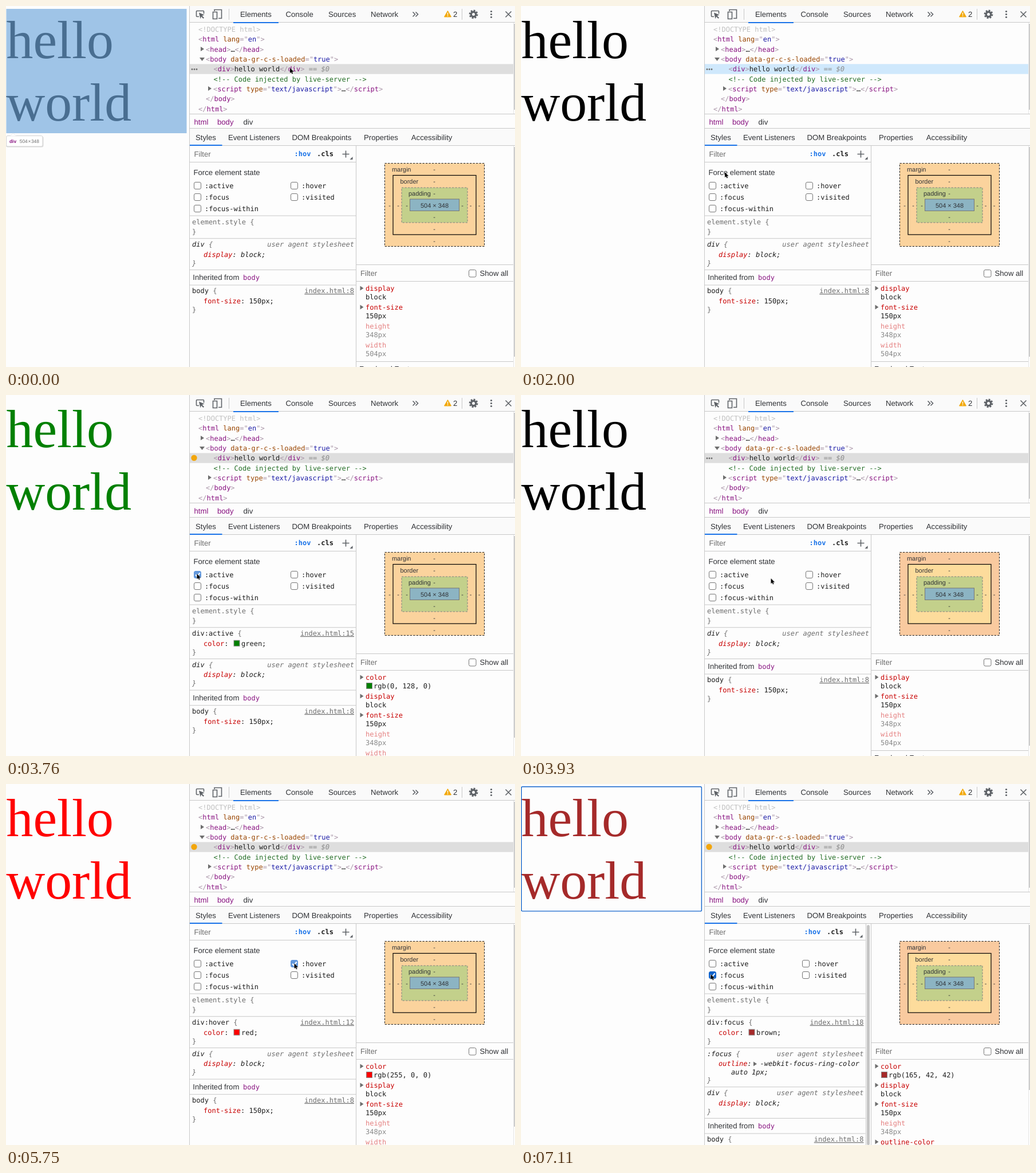
An HTML page that plays this animation: 889 px wide and 630 px high, repeating every 8 s.

```html
<!DOCTYPE html>
<html lang="en">
<head>
<meta charset="utf-8">
<title>Forcing element states</title>
<style>
html, body { margin: 0; width: 100%; height: 100%; overflow: hidden; background: #fdfdfd; }
svg { display: block; width: 889px; height: 630px; }
text { white-space: pre; text-rendering: geometricPrecision; fill: #303236; }
.ui { font: 13.15px "Liberation Sans", Arial, sans-serif; }
.small { font-size: 10.95px; }
.code { font: 12px "DejaVu Sans Mono", monospace; fill: #1c1c1c; }
.it { font-style: italic; }
.bold { font-weight: bold; }
.end { text-anchor: end; }
.mid { text-anchor: middle; }
.link { text-decoration: underline; }
.tag { fill: #881280; }
.punct { fill: #a894a6; }
.attr { fill: #994500; }
.val { fill: #1a1aa6; }
.note { fill: #236e25; }
.pale { fill: #c0c0c0; }
.gray { fill: #6e6e6e; }
.prop { fill: #c80000; }
.dimprop { fill: #e58080; }
.dim { fill: #888; }
.blue { fill: #1a73e8; }
.line { stroke: #c8c8c8; fill: none; }
.track { stroke: #e6e6e6; }
.thumb { fill: #c4c4c4; }
.icon { stroke: #5f6368; fill: none; stroke-width: 1.6; }
.box { fill: #fff; stroke: #767676; }
.hello { font: 93.75px "Liberation Serif", "Times New Roman", serif; }

.hello, #inspect, #row, #dots, #dot, #ring, #cursor, #press, .state, #margin, #border {
  animation: 8s step-end infinite;
}
.hello { fill: #000; animation-name: hello; }
@keyframes hello {
  0%, 49.125%, 73.625% { fill: #000; }
  36.5% { fill: green; }
  59.875% { fill: red; }
  87.375% { fill: brown; }
}
#inspect { animation-name: inspect; }
@keyframes inspect { 0% { opacity: 1; } 23.125% { opacity: 0; } }
#row { animation-name: row; }
@keyframes row { 0%, 34.625% { fill: #dedede; } 1.5% { fill: #cfe8fc; } }
#plain, #dots { animation-name: plain; }
@keyframes plain {
  0%, 49.125%, 73.625% { opacity: 1; }
  36.5%, 59.875%, 87.375% { opacity: 0; }
}
#dot { animation-name: forced; }
@keyframes forced {
  0%, 49.125%, 73.625% { opacity: 0; }
  36.5%, 59.875%, 87.375% { opacity: 1; }
}
#active { animation-name: active; }
@keyframes active { 0%, 49.125% { opacity: 0; } 36.5% { opacity: 1; } }
#hover { animation-name: hover; }
@keyframes hover { 0%, 73.625% { opacity: 0; } 59.875% { opacity: 1; } }
#focus, #ring { animation-name: focus; }
@keyframes focus { 0% { opacity: 0; } 87.375% { opacity: 1; } }
#margin { animation-name: margin; }
@keyframes margin {
  0%, 59.875% { fill: #fbd39d; }
  49.125%, 73.625% { fill: #f9ca9f; }
}
#border { animation-name: border; }
@keyframes border {
  0%, 59.875% { fill: #fbd39d; }
  49.125%, 73.625% { fill: #fddc9c; }
}
#press { animation-name: press; }
@keyframes press {
  0%, 36.5%, 49.125%, 59.875%, 73.625%, 87.375% { opacity: 0; }
  34.625%, 47% { opacity: 1; transform: translate(328px, 307px); }
  58.5%, 71.875% { opacity: 1; transform: translate(497px, 307px); }
  85.875% { opacity: 1; transform: translate(328px, 327px); }
}
#cursor { animation-name: cursor; }
@keyframes cursor {
  0% { transform: translate(496px, 108px); }
  19.875% { transform: translate(488.5px, 121.5px); }
  21.375% { transform: translate(404.5px, 227px); }
  23.125% { transform: translate(374px, 257px); }
  25% { transform: translate(356px, 290px); }
  26.875% { transform: translate(339.5px, 308px); }
  28.75% { transform: translate(336px, 311px); }
  30.125% { transform: translate(334px, 312px); }
  31.625% { transform: translate(333.5px, 312px); }
  49.125% { transform: translate(436.5px, 320px); }
  50.625% { transform: translate(485.5px, 317px); }
  52.5% { transform: translate(500px, 314px); }
  54% { transform: translate(503.5px, 313px); }
  75.125% { transform: translate(502px, 314px); }
  76.875% { transform: translate(490px, 319px); }
  78.375% { transform: translate(438px, 326px); }
  79.875% { transform: translate(373px, 331px); }
  81.375% { transform: translate(339.5px, 333px); }
  82.875% { transform: translate(332px, 332px); }
  88.875% { transform: translate(331.5px, 332px); }
}
</style>
</head>
<body>
<svg id="stage" viewBox="0 0 889 630"></svg>
<script>
const esc = s => s.replace(/&/g, '&amp;').replace(/</g, '&lt;');
const span = (cls, s) => `<tspan class="${cls}">${esc(s)}</tspan>`;
const write = (x, y, cls, inner) => `<text x="${x}" y="${y}" class="${cls}">${inner}</text>`;
const ui = (x, y, s, cls = '') => write(x, y, 'ui ' + cls, esc(s));
const code = (x, y, inner, cls = '') => write(x, y, 'code ' + cls, inner);
const rect = (x, y, w, h, extra = '') => `<rect x="${x}" y="${y}" width="${w}" height="${h}" ${extra}/>`;
const path = (d, extra) => `<path d="${d}" ${extra}/>`;
const line = (d, cls = '') => path(d, `class="line ${cls}"`);
const fill = c => `fill="${c}"`;
const right = (x, y) => path(`M${x} ${y - 4}l6 4l-6 4z`, fill('#6e6e6e'));
const down = (x, y) => path(`M${x} ${y - 3}h9l-4.5 6z`, fill('#6e6e6e'));
const swatch = (x, y, c) => rect(x + .5, y + .5, 10, 10, `fill="${c}" stroke="#8a8a8a"`);

const open = (name, attr, value) => span('punct', '<') + span('tag', name) +
  (attr ? span('attr', ' ' + attr) + span('punct', '="') + span('val', value) + span('punct', '"') : '') +
  span('punct', '>');
const close = name => span('punct', '</') + span('tag', name) + span('punct', '>');

function page() {
  return write(.5, 91, 'hello', 'hello') + write(.5, 199.7, 'hello', 'world') +
    `<g id="inspect">${rect(.5, 5, 315, 217, 'fill="#6fa8dc" fill-opacity=".66"')}
      ${rect(0, 227.5, 65.5, 19, 'rx="3" fill="#ddd"')}
      ${rect(.5, 226.5, 63.5, 18.5, 'rx="2.5" fill="#fff" stroke="#d2d2d2"')}
      ${path('M7 227l5.5-5l5.5 5z', 'fill="#fff" stroke="#ddd" stroke-width=".6"')}
      <text x="6" y="239" class="ui bold tag" style="font-size:8.4px">div</text>
      <text x="23.8" y="239" class="ui gray" style="font-size:8.4px;word-spacing:-1.7px">504 × 348</text></g>` +
    rect(.6, 4.7, 314.8, 217.2, 'id="ring" rx="2" fill="none" stroke="#1264cc" stroke-width="1.4"');
}

function toolbar() {
  return rect(321, 0, 568, 28, fill('#fafafa')) + line('M320.5 0V630M321 28.5H889') +
    path('M337 18.5h-3.5q-1 0-1-1v-8q0-1 1-1h11q1 0 1 1v4', 'class="icon"') +
    path('M337 11.5l9.5 4l-4 1.5l3.5 3.5l-1.5 1.5l-3.5-3.5l-1.5 4z', fill('#5f6368')) +
    path('M364 9V6.5h12.5v15H371M361.5 10.5h7v12h-7z', 'class="icon"') +
    line('M389.5 5V24M796.5 5V24') +
    [[409, 'Elements'], [488.5, 'Console'], [563, 'Sources'], [637, 'Network']]
      .map(([x, s]) => ui(x, 19.3, s)).join('') +
    rect(397, 28, 79, 2, 'class="blue"') +
    path('M710.5 10.5l4 4l-4 4M715.5 10.5l4 4l-4 4', 'class="icon"') +
    path('M771.5 8.5l6 10.5h-12z', 'fill="#f2a90c" stroke="#f2a90c" stroke-linejoin="round"') +
    path('M771.5 11.5v4M771.5 16.5v1.5', 'stroke="#fff" stroke-width="1.3"') +
    ui(781, 19, '2') +
    '<circle cx="816.5" cy="14.5" r="6.6" fill="none" stroke="#5f6368" stroke-width="2.6" stroke-dasharray="2.9 2.28"/>' +
    '<circle cx="816.5" cy="14.5" r="4.2" fill="none" stroke="#5f6368" stroke-width="3.4"/>' +
    [9.5, 14.5, 19.5].map(y => `<circle cx="847.5" cy="${y}" r="1.6" fill="#5f6368"/>`).join('') +
    path('M872.5 9.5l10 10M882.5 9.5l-10 10', 'class="icon"');
}

function tree() {
  const row = i => 45 + 17.32 * i;
  return rect(321, 101.3, 565, 17.4, 'id="row"') +
    '<g id="dots">' + [325, 329, 333].map(x => `<circle cx="${x}" cy="110.5" r="1.4" fill="#6e6e6e"/>`).join('') + '</g>' +
    '<circle id="dot" cx="328.5" cy="109.8" r="5.2" fill="#f2a60c"/>' +
    code(336, row(0), esc('<!DOCTYPE html>'), 'pale') +
    code(336, row(1), open('html', 'lang', 'en')) +
    right(340, 75) + code(349, row(2), open('head') + '…' + close('head')) +
    down(338, 93) + code(349, row(3), open('body', 'data-gr-c-s-loaded', 'true')) +
    code(362.5, row(4), open('div') + 'hello world' + close('div') + span('dim it', ' == $0')) +
    code(362.5, row(5), esc('<!-- Code injected by live-server -->'), 'note') +
    right(353, 144) + code(362, row(6), open('script', 'type', 'text/javascript') + '…' + close('script')) +
    code(349, row(7), close('body')) + code(336, row(8), close('html')) +
    line('M321 188.5H889M321 213.5H889') + line('M886.5 29V188', 'track') +
    rect(887.3, 31, 1.7, 150, 'class="thumb"') +
    ui(328.5, 206.5, 'html', 'tag') + ui(369, 206.5, 'body', 'tag') + ui(414.5, 206.5, 'div');
}

function sidebar() {
  const dashes = [[748, 289], [748, 310], [748, 331], [748, 372], [748, 393], [748, 413.5],
    [670, 351.5], [685, 351.5], [700, 351.5], [797, 351.5], [811.5, 351.5], [826.5, 351.5]];
  return rect(321, 214, 568, 29, fill('#fafafa')) +
    [[331, 'Styles'], [388, 'Event Listeners'], [499.5, 'DOM Breakpoints'], [625, 'Properties'], [707.8, 'Accessibility']]
      .map(([x, s]) => ui(x, 233.5, s)).join('') +
    line('M321 243.5H889M611.5 244V630M612 451.5H886M612 480.5H886') + line('M886.5 244V630', 'track') +
    rect(321, 242, 56.5, 2, 'class="blue"') +
    rect(661.5, 274.5, 174, 145, 'id="margin" stroke="#222" stroke-dasharray="3.3 2.2"') +
    rect(676, 295.5, 145, 103.5, 'id="border" stroke="#000" stroke-width="1.2"') +
    rect(691, 317, 115, 61, 'fill="#c3d08b" stroke="#808080" stroke-dasharray="3.3 2.2"') +
    rect(705.5, 337, 86, 20.5, 'fill="#8cb4c3" stroke="#777"') +
    ui(674, 289, 'margin', 'small') + ui(688.5, 310, 'border', 'small') + ui(703, 331, 'padding', 'small') +
    ui(748.5, 351.5, '504 × 348', 'small mid') +
    dashes.map(([x, y]) => ui(x, y, '-', 'small mid')).join('') +
    ui(619, 471, 'Filter', 'gray') + rect(808.5, 460.5, 12.5, 12.5, 'rx="2.5" class="box"') + ui(827.5, 471, 'Show all');
}

function check(x, y, label, on, gap = 19) {
  const extra = on ? 'rx="2.5" fill="#0e62cb" stroke="#0e62cb"' : 'rx="2.5" class="box"';
  return rect(x + .5, y + .5, 12, 12, extra) +
    (on ? path(`M${x + 3} ${y + 6.8}l2.7 2.7l5-6`, 'fill="none" stroke="#fff" stroke-width="2"') : '') +
    code(x + gap, y + 11, label);
}

// One style rule, with y as its top edge.
function rule(y, edge, selector, body, origin, agent) {
  const it = agent ? 'it' : '';
  return code(325, y + 14.2, selector + span('gray', ' {'), it) +
    code(edge - 3, y + 14.2, origin, agent ? 'end gray it' : 'end gray link') +
    body.map((b, i) => code(i ? 367 : 345, y + 32 + i * 14.4, b, it)).join('') +
    code(325, y + 33 + body.length * 14, '}', 'gray ' + it);
}

function styles(name, color, at) {
  const focus = name === 'focus';
  const edge = focus ? 601.5 : 611;
  const shift = focus ? 9 : 0;
  const col = focus ? 491 : 497;
  const gap = focus ? 20 : 19;
  const decl = (p, v) => span('prop', p) + ': ' + v + ';';
  const sep = y => line(`M321 ${y}H${edge}`);
  let y = 405.7;
  let out = ui(328.5, 262.5, 'Filter', 'gray') +
    code(503.5 - shift, 262, ':hov', 'bold blue') + code(543 - shift, 262, '.cls', 'bold') +
    path(`M${587.5 - shift} 258.5h12m-6-6v12`, 'class="icon"') +
    path(`M${605.5 - shift} 263v5h-5z`, fill('#5f6368')) + sep(272.5) +
    ui(327.5, 294.5, 'Force element state') +
    check(328, 307, ':active', name === 'active') + check(328, 327, ':focus', focus) +
    check(328, 347, ':focus-within') +
    check(col, 307, ':hover', name === 'hover', gap) + check(col, 327, ':visited', false, gap) +
    sep(366) + code(325, 380.7, 'element.style {', 'gray') + code(325, 398, '}', 'gray') + sep(y);
  const add = (height, part) => {
    y += height;
    out += part + sep(y);
  };
  if (color) {
    out += swatch(397.5, y + 22, color);
    add(54.7, rule(y, edge, 'div:' + name,
      [span('prop', 'color') + `:<tspan x="411">${color};</tspan>`], 'index.html:' + at));
  }
  if (focus) {
    out += right(406, y + 28);
    add(68.3, rule(y, edge, ':focus',
      [span('prop', 'outline') + ':<tspan x="417.5">-webkit-focus-ring-color</tspan>', 'auto 1px;'],
      'user agent stylesheet', true));
  }
  add(54.7, rule(y, edge, 'div', [decl('display', 'block')], 'user agent stylesheet', true));
  add(26.6, ui(326.3, y + 17.8, 'Inherited from') + code(414, y + 18, 'body', 'tag'));
  out += rule(y, edge, 'body', [decl('font-size', '150px')], 'index.html:8');
  if (focus) out += line('M602.5 244V630') + rect(604, 246, 5, 384, 'rx="2.5" class="thumb"');
  return out;
}

function computed(name, color, rgb) {
  const list = [['display', 'block'], ['font-size', '150px'], ['height', '348px', true]];
  if (color) list.unshift(['color', rgb]);
  list.push(name === 'focus' ? ['outline-color', rgb] : ['width', '504px', true]);
  const thumb = { plain: 366, focus: 288 }[name] || 352;
  let out = rect(887.3, 246, 1.7, thumb, 'class="thumb"');
  list.forEach(([prop, value, dim], i) => {
    const y = 497 + 33 * i;
    const chip = color && value === rgb;
    if (!dim) out += right(618.5, y - 4.5);
    if (chip) out += swatch(629, y + 5, color);
    out += code(628, y, prop, dim ? 'dimprop' : 'prop') + code(chip ? 642 : 628, y + 14.5, value, dim ? 'dim' : '');
  });
  if (!color) out += line('M612 620.5H886') + ui(617, 637.5, 'Rendered Fonts');
  return out;
}

const states = [
  ['plain'],
  ['active', 'green', 15, 'rgb(0, 128, 0)'],
  ['hover', 'red', 12, 'rgb(255, 0, 0)'],
  ['focus', 'brown', 18, 'rgb(165, 42, 42)']
];

document.getElementById('stage').innerHTML =
  page() + rect(320, 0, 569, 630, fill('#fdfdfd')) + toolbar() + tree() + sidebar() +
  states.map(([name, color, at, rgb]) =>
    `<g id="${name}" class="state">${styles(name, color, at)}${computed(name, color, rgb)}</g>`).join('') +
  rect(0, 0, 13, 13, 'id="press" rx="2.5" fill="#fff" fill-opacity=".35"') +
  path('M0 0V9.2L2.1 7.3L3.5 10.5L5.1 9.8L3.7 6.7H6.6Z',
    'id="cursor" fill="#000" stroke="#fff" stroke-width=".8" paint-order="stroke"');
</script>
</body>
</html>
```
